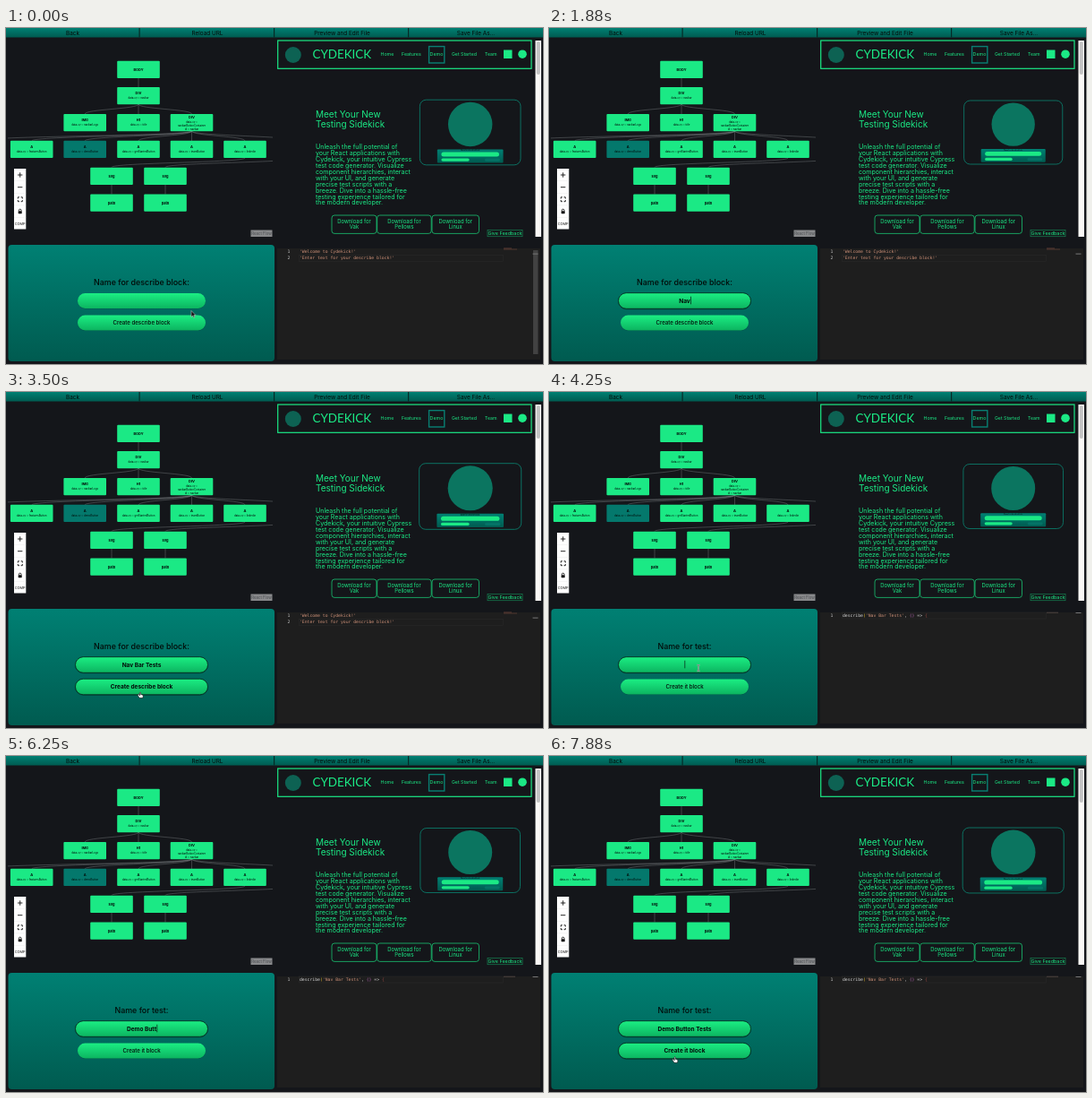
Write an HTML page that moves like this. It is 600 by 375 pixels and loops after 8000 ms.

```html
<!DOCTYPE html>
<html lang="en">
<head>
<meta charset="utf-8">
<title>Test builder</title>
<style>
  html, body { margin: 0; width: 100%; height: 100%; overflow: hidden; background: #14161a; }
  svg { display: block; width: 600px; height: 375px; font-family: Inter, sans-serif; }
  text { white-space: pre; }
  .mid { text-anchor: middle; }
  .code { font: 4.78px "DejaVu Sans Mono", monospace; }
  .pill text { font-size: 6.1px; font-weight: 500; }
  .hot text { font-weight: 700; font-size: 6.3px; }
  .hot rect { stroke: #06281e; stroke-width: .8; }
</style>
</head>
<body>
<svg id="stage" viewBox="0 0 600 375">
  <defs>
    <linearGradient id="teal" x2="0" y2="1"><stop stop-color="#008073"/><stop offset="1" stop-color="#005b50"/></linearGradient>
    <linearGradient id="green" x2="0" y2="1"><stop stop-color="#1bee83"/><stop offset="1" stop-color="#0cb460"/></linearGradient>
    <clipPath id="treeClip"><path d="M2 10H298V240H2Z"/></clipPath>
  </defs>
</svg>
<script>
const GREEN = '#1be985', INK = '#020b08';
const stage = document.getElementById('stage');
const $ = id => document.getElementById(id);
const add = html => stage.insertAdjacentHTML('beforeend', html);
const rect = (x, y, w, h, fill, more = '') =>
  `<rect x="${x}" y="${y}" width="${w}" height="${h}" fill="${fill}" ${more}/>`;
const text = (x, y, size, str, fill = INK, more = '') =>
  `<text x="${x}" y="${y}" font-size="${size}" fill="${fill}" ${more}>${str}</text>`;
const mid = (x, y, size, str, fill, more = '') => text(x, y, size, str, fill, 'class="mid" ' + more);
const outline = (w = .8, color = GREEN) => `stroke="${color}" stroke-width="${w}"`;

function topBar() {
  const labels = [['Back', 74.5], ['Reload URL', 225], ['Preview and Edit File', 375.5], ['Save File As...', 525]];
  add(rect(0, 0, 600, 10.5, 'url(#teal)') +
    [148.5, 299, 449].map(x => rect(x, 0, 1.2, 10.5, '#052b27')).join('') +
    labels.map(([s, x]) => mid(x, 7.6, 6.4, s)).join(''));
}

function tree() {
  const edge = (x1, y1, x2, y2) => {
    const m = (y1 + y2) / 2;
    return `<path d="M${x1} ${y1}C${x1} ${m} ${x2} ${m} ${x2} ${y2}"/>`;
  };
  const node = (x, y, tag, lines = [], picked) => {
    const top = lines.length ? y + (lines.length > 1 ? 4.7 : 8.3) : y + 11.2;
    return rect(x - 23.8, y, 47.6, 19.2, picked ? '#04786c' : GREEN, 'rx="1"') +
      mid(x, top, 3.9, tag, INK, 'font-weight="700"') +
      lines.map((s, i) => mid(x, top + 4.9 + i * 4.4, 2.85, s)).join('');
  };
  const cols = [28.7, 88.2, 148, 207.5, 267];
  const names = ['featuresButton', 'demoButton', 'getStartedButton', 'teamButton', 'linkedin'];
  const edges = edge(148, 56, 148, 66) +
    cols.slice(1, 4).map(x => edge(148, 85, x, 96)).join('') +
    [-31, ...cols, 327].map(x => edge(207.5, 115, x, 126)).join('') +
    edge(267, 145, 118, 155.5) + edge(327, 145, 178, 155.5) +
    edge(118, 175, 118, 185.5) + edge(178, 175, 178, 185.5);
  add(`<g clip-path="url(#treeClip)"><g fill="none" stroke="#85888b" stroke-width=".4">${edges}</g>` +
    node(148, 36.7, 'BODY') + node(148, 66, 'DIV', ['data-cy = navbar']) +
    node(88.2, 96, 'IMG', ['data-cy = navbarLogo']) + node(148, 96, 'H1', ['data-cy = title']) +
    node(207.5, 96, 'DIV', ['data-cy =', 'navbarButtonContainer', 'id = navbar']) +
    cols.map((x, i) => node(x, 125.7, 'A', ['data-cy = ' + names[i]], i === 1)).join('') +
    [118, 178].map(x => node(x, 155.7, 'svg') + node(x, 185.5, 'path')).join('') + '</g>');

  add(rect(9, 157, 13.3, 67.5, '#fefefe') +
    [170.6, 184.2, 197.8, 211.4].map(y => rect(9, y, 13.3, .3, '#ddd')).join('') +
    `<g fill="none" stroke="#111" stroke-width=".9"><path d="M13 164h5.4M15.7 161.3v5.4M13 177.7h5.4"/>
     <path d="M13.3 190.5v-1.7h1.7M16.6 188.8h1.7v1.7M18.3 192v1.7h-1.7M15 193.7h-1.7v-1.7"/>
     <path d="M14.4 204.5v-1a1.3 1.3 0 0 1 2.6 0v1"/></g>` +
    rect(13.7, 204.2, 4, 3, '#111', 'rx=".4"') + mid(15.7, 219.6, 3.9, 'COMP', '#111') +
    rect(273.5, 225.5, 24, 7.5, '#88898b') + mid(285.5, 231, 4.3, 'React Flow', '#4c4e52'));
}

function preview() {
  add(rect(303.7, 14, 283.3, 31.3, 'none', outline(1.2)) +
    '<circle cx="320.8" cy="30" r="9" fill="#0d6253"/>' +
    text(342.5, 34.4, 13.4, 'CYDEKICK', GREEN, 'font-family="Lato, sans-serif"') +
    text(418.5, 31.4, 5.3, 'Home', GREEN) + text(442, 31.4, 5.3, 'Features', GREEN) +
    text(473.6, 31.4, 5.3, 'Demo', GREEN) +
    `<g id="navEnd">${text(497, 31.4, 5.2, 'Get Started', GREEN)}${text(534, 31.4, 5.2, 'Team', GREEN)}</g>` +
    rect(472.6, 20.6, 17.2, 18.4, 'none', 'id="mark" ' + outline(1.4, '#087f72')) +
    rect(556, 24.5, 9.5, 9.5, GREEN) + `<circle cx="577" cy="29.2" r="4.8" fill="${GREEN}"/>` +
    rect(591.5, 14, 6.5, 219, '#faf8f6') + rect(592.8, 15, 4, 37, '#c3c3c3', 'rx="2"'));

  const words = ['Unleash the full potential of', 'your React applications with',
    'Cydekick, your intuitive Cypress', 'test code generator. Visualize',
    'component hierarchies, interact', 'with your UI, and generate',
    'precise test scripts with a', 'breeze. Dive into a hassle-free',
    'testing experience tailored for', 'the modern developer.'];
  add(text(346, 100.4, 10, 'Meet Your New', GREEN) +
    text(346, 110.8, 10, 'Testing Sidekick', GREEN) +
    words.map((s, i) => text(346, 135.2 + i * 6.92, 7.05, s, GREEN)).join(''));

  add('<g id="card">' + rect(-55.8, -36, 111.6, 72, 'none', 'rx="7" ' + outline(.8, '#0b8673')) +
    '<circle cy="-9" r="24.5" fill="#0b7560"/>' +
    rect(-36.5, 18.8, 73, 15, 'url(#teal)', 'rx="1"') + mid(0, 20.8, 1.8, 'Name for describe block:') +
    rect(-32, 21.7, 64, 5, GREEN, 'rx="2.5"') +
    rect(-32, 28.7, 31, 3.2, GREEN, 'rx="1.6"') + rect(16, 28.7, 17, 3.2, '#047366', 'rx="1.6"') + '</g>');

  const downloads = [[364, 50, 'Vak'], [414.7, 60.5, 'Pellows'], [476, 52.5, 'Linux']];
  add(downloads.map(([x, w, s]) => rect(x, 209, w, 20.4, 'none', 'rx="3" ' + outline(.65)) +
    mid(x + w / 2, 218.2, 5.9, 'Download for', GREEN) + mid(x + w / 2, 224.4, 5.9, s, GREEN)).join('') +
    rect(538, 225.4, 39, 7.4, '#15181b', outline(.5, '#15a866')) + mid(557.5, 231, 5.4, 'Give Feedback', GREEN));
}

function editor() {
  const line = (y, n, body) => text(314.6, y, 4.78, n, '#c6c6c6', 'class="code"') +
    `<text x="328" y="${y}" class="code" fill="#ce9178">${body}</text>`;
  const span = (s, fill) => `<tspan fill="${fill}">${s}</tspan>`;
  const current = y => rect(327.5, y, 228, 7, 'none', outline(.5, '#2b2b2b'));
  add(rect(303, 246, 294, 124, '#1e1e1e') + rect(589, 248, 5.5, 116, '#424242', 'id="scroll"') +
    `<g id="intro">${current(253.3)}${line(251, 1, "'Welcome to Cydekick!'")}${line(258.4, 2, "'Enter text for your describe block!'")}
      ${rect(556, 245.6, 9, .7, '#70483a')}${rect(556, 246.7, 15, .6, '#70483a')}${rect(588.5, 251.6, 6, 1, '#777')}</g>` +
    '<g id="suite">' + current(246) + line(251, 1, span('describe', '#d4d4d4') + span('(', '#e0bd2a') + "'Nav Bar Tests'" +
      span(', ', '#d4d4d4') + span('()', '#c66bc2') + span(' =&gt; ', '#d4d4d4') + span('{', '#8c4540')) +
    rect(556, 245.8, 13, .7, '#66574f') + rect(588.5, 246, 6, 1, '#777') + '</g>');
}

function form() {
  const pill = id => `<g id="${id}" class="pill">${rect(-71.5, -8.2, 143, 17.2, '#003f35', 'rx="8.5" opacity=".45"')}
    ${rect(-71.5, -8.5, 143, 17, 'url(#green)', 'rx="8.5"')}${mid(0, 2.3, 6.2, '')}</g>`;
  const bar = 'M-1.5-3.5Q0-3.5 0-2.5Q0-3.5 1.5-3.5M0-2.5V2.5M-1.5 3.5Q0 3.5 0 2.5Q0 3.5 1.5 3.5';
  add(rect(2.5, 242, 297.5, 130, 'url(#teal)', 'rx="4"') + mid(151.5, 287, 8.9, '', INK, 'id="title" font-weight="500"') +
    pill('input') + pill('button') + rect(0, 299.7, .7, 8.6, '#061912', 'id="caret"') +
    `<g id="arrow"><path d="M0 0V7L1.7 5.5 2.8 8 3.9 7.5 2.8 5.1H5Z" fill="#111" stroke="#ddd" stroke-width=".5"/></g>
     <g id="beam" fill="none"><path d="${bar}" stroke="#d5f7e5" stroke-width="1.3"/><path d="${bar}" stroke="#222" stroke-width=".6"/></g>
     <g id="hand"><path d="M-.6 .5Q0-.6 .6 .5V2.5L3 3.2Q3.6 4 2.8 6.5H-.8L-2.7 3.8Q-2-.1-.6 4Z" fill="#fff" stroke="#111" stroke-width=".6"/></g>`);
}

topBar(); tree(); preview(); editor(); form();

// Pointer stops: time, x, y
const STOPS = [[0, 207, 315.5], [200, 207, 315.5], [800, 182, 304], [3200, 182, 304],
  [3450, 150, 335], [3800, 150, 335], [4150, 167, 308], [7450, 167, 308], [7750, 140.7, 335.8], [8000, 140.7, 335.8]];
const SUBMIT = 3700;

function pointerAt(t) {
  const i = Math.max(1, STOPS.findIndex(s => s[0] > t));
  const [t0, x0, y0] = STOPS[i - 1], [t1, x1, y1] = STOPS[i];
  const u = (t - t0) / (t1 - t0), e = u * u * (3 - 2 * u);
  return [x0 + (x1 - x0) * e, y0 + (y1 - y0) * e];
}
const between = (t, a, b) => t >= a && t < b;
const show = (id, on) => $(id).setAttribute('display', on ? 'inline' : 'none');
const typed = (str, t, start, step) => str.slice(0, Math.max(0, Math.floor((t - start) / step) + 1));

function setPill(id, y, str, hot) {
  const g = $(id), label = g.querySelector('text');
  g.setAttribute('class', hot ? 'pill hot' : 'pill');
  g.setAttribute('transform', `translate(151.5 ${y}) scale(${hot ? 1.035 : 1})`);
  if (label.textContent !== str) label.textContent = str;
  return label;
}

function draw(t) {
  const second = t >= SUBMIT;
  const [x, y] = pointerAt(t);
  const hidden = between(t, 1450, 3200) || between(t, 4800, 7450);
  const over = cy => !hidden && Math.abs(x - 151.5) < 74 && Math.abs(y - cy) < 8.9;
  const overInput = over(304.5), overButton = over(329);
  const focused = between(t, 1300, SUBMIT) || t >= 4150;
  const value = second ? typed('Demo Button Tests', t, 4890, 160) : typed('Nav Bar Tests', t, 1560, 130);

  $('title').textContent = second ? 'Name for test:' : 'Name for describe block:';
  const label = setPill('input', 304.5, value, focused || overInput);
  setPill('button', 329, second ? 'Create it block' : 'Create describe block', overButton);
  const typing = between(t, 1560, 3200) || between(t, 4890, 7450);
  show('caret', focused && !overButton && (typing || t % 1000 < 500));
  $('caret').setAttribute('x', 151.5 + (value ? label.getComputedTextLength() * 1.035 / 2 + .4 : 0));

  for (const [id, on] of [['beam', overInput], ['hand', overButton], ['arrow', !overInput && !overButton]]) {
    show(id, on && !hidden);
    $(id).setAttribute('transform', `translate(${x} ${y})`);
  }
  show('intro', !second);
  show('suite', second);
  $('scroll').setAttribute('opacity', Math.max(0, 1 - t / 800));

  const marked = (t + 500) % 2000 < 1000;
  show('mark', marked);
  $('navEnd').setAttribute('transform', `translate(${marked ? 1 : 0})`);
  const pulse = 1 + .024 * Math.cos((t - 3250) / 4000 * 2 * Math.PI);
  $('card').setAttribute('transform', `translate(518.7 116.5) scale(${pulse})`);
}

function tick() {
  draw(performance.now() % 8000);
  requestAnimationFrame(tick);
}
tick();
</script>
</body>
</html>
```
